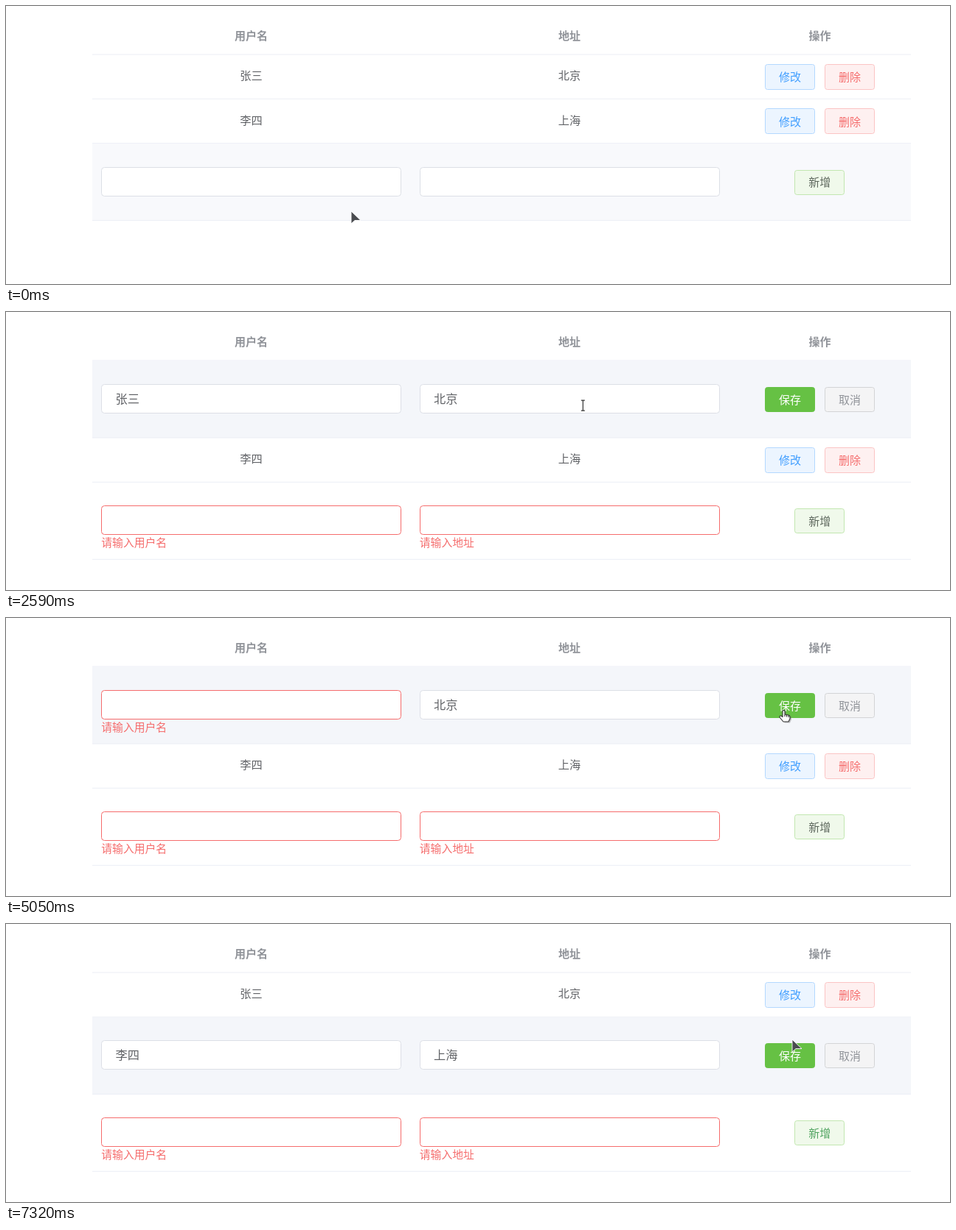
Animation of 1280x378 px, one loop 7390 ms. Source, as an HTML page:

```html
<!DOCTYPE html>
<html lang="zh-CN">
<head>
<meta charset="utf-8">
<style>
html, body { margin: 0; height: 100%; overflow: hidden; background: #fff; }
svg { display: block; width: 100%; height: 100%; }
text { font-family: "Noto Sans CJK SC", "Noto Sans CJK", sans-serif; white-space: pre; }
</style>
</head>
<body>
<svg id="stage" viewBox="0 0 1280 378"></svg>
<script>
const LOOP = 7390;
const stage = document.getElementById('stage');

// main, pale background, pale border
const THEMES = {
  primary: ['#409eff', '#ecf5ff', '#b3d8ff'],
  danger: ['#f56c6c', '#fef0f0', '#fbc4c4'],
  success: ['#66c144', '#f0f9eb', '#c2e7b0'],
  info: ['#909399', '#f4f4f5', '#d3d4d6']
};

// Pointer path: time, x, y, shape from this moment on
const PATH = [
  [0, 468, 279, 'arrow'], [70, 468, 279, 'arrow'], [200, 438, 274, 'arrow'],
  [560, 900, 222, 'arrow'], [740, 1085, 230, 'hand'], [800, 1090, 236, 'hand'],
  [1130, 1090, 236, 'hand'], [1260, 1077, 223, 'hand'], [1330, 1067, 166, 'hand'],
  [1470, 1062, 101, 'hand'], [2260, 1062, 101, 'arrow'], [2400, 960, 112, 'arrow'],
  [2440, 925, 116, 'beam'], [2590, 783, 127, 'beam'], [2920, 560, 142, 'arrow'],
  [3130, 440, 140, 'arrow'], [3200, 400, 126, 'beam'], [3720, 308, 121, 'beam'],
  [3990, 150, 121, 'beam'], [4130, 150, 121, 'none'], [4260, 440, 146, 'arrow'],
  [4330, 503, 150, 'arrow'], [4700, 960, 136, 'arrow'], [4800, 1042, 128, 'hand'],
  [4860, 1054, 125, 'hand'], [5390, 1054, 125, 'hand'], [5560, 1112, 122, 'hand'],
  [5790, 1143, 121, 'hand'], [5990, 1146, 125, 'none'], [6190, 1148, 143, 'hand'],
  [6420, 1105, 160, 'hand'], [6650, 1066, 165, 'hand'], [6860, 1066, 165, 'arrow'],
  [7050, 1066, 157, 'arrow'], [LOOP, 1066, 157, 'arrow']
];

const SHAPES = {
  arrow: '<path d="M0 0V17L5 12.5H13Z" fill="#4a4c50" stroke="#fff" stroke-width=".9"/>',
  beam: '<path d="M-2.5 -7H2.5M0 -7V7M-2.5 7H2.5" fill="none" stroke="#333" stroke-width="1.2"/>',
  hand: '<path d="M0 1.5Q1.5 -.8 3 1.5V6L8 7Q10 7.5 10 9.5V12L8 16.5H1L-4 10.5Q-4.6 8 -2 8.5L0 10Z" ' +
    'transform="translate(1 1)" fill="#666" opacity=".4"/>' +
    '<path d="M-1 1.5Q.5 -.8 2 1.5V6L7 7Q9 7.5 9 9.5V12L7 16H0L-5 10Q-5.4 7.6 -3 8L-1 9.5Z' +
    'M2 6V9M4.5 7V9.5M7 7.5V10" fill="#fff" stroke="#333" stroke-width="1.1" stroke-linejoin="round"/>',
  none: ''
};

const clamp = v => Math.max(0, Math.min(1, v));
const between = (t, a, b) => t >= a && t < b;
const fade = (t, on, off) => clamp((t - on) / 250) * (1 - clamp((t - off) / 250));

function rect(x, y, w, h, fill, extra = '') {
  return `<rect x="${x}" y="${y}" width="${w}" height="${h}" fill="${fill}" ${extra}/>`;
}

// Rounded box whose one-pixel border sits on whole pixels
function box(x, y, w, h, r, fill, edge) {
  return rect(Math.round(x) + .5, Math.round(y) + .5, w - 1, h - 1, fill, `rx="${r}" stroke="${edge}"`);
}

function label(s, x, cy, size, fill, extra = 'text-anchor="middle"') {
  return `<text x="${x}" y="${cy + size * 0.38}" font-size="${size}" fill="${fill}" ${extra}>${s}</text>`;
}

function button(s, x, y, h, theme, hot, color) {
  const [main, pale, edge] = THEMES[theme];
  return box(x, y, 68, h, 3, hot ? main : pale, hot ? main : edge) +
    label(s, x + 34, y + h / 2, 15, hot ? '#fff' : color || main);
}

function input(x, top, value, edge, error) {
  return box(x, top + 32, 407, 40, 4, '#fff', edge) +
    label(value, x + 19.5, top + 52, 16.2, '#606266', '') +
    (error ? label(error, x + .3, top + 82.3, 14.8, '#f56c6c', '') : '');
}

function backdrop(top, h, glow) {
  return rect(117, top, 1110, h, '#f4f6fa', `opacity="${glow}"`) +
    rect(117, top + h - .5, 1110, 1, '#ebeef5');
}

function viewRow(top, name, place, glow, hotEdit, hotDelete) {
  return backdrop(top, 60.3, glow) +
    label(name, 332.5, top + 28.5, 15.2, '#606266') +
    label(place, 764, top + 28.5, 15.2, '#606266') +
    button('修改', 1029, top + 13, 35, 'primary', hotEdit) +
    button('删除', 1110, top + 13, 35, 'danger', hotDelete);
}

function editRow(top, name, place, glow, hotSave, hotCancel, edge = '#dcdfe6', error = '') {
  return backdrop(top, 105, glow) +
    input(129, top, name, edge, error) +
    input(560.5, top, place, '#dcdfe6') +
    button('保存', 1029, top + 36, 34, 'success', hotSave) +
    button('取消', 1110, top + 36, 34, 'info', hotCancel);
}

function addRow(top, t) {
  const bad = t >= 880, edge = bad ? '#f56c6c' : '#dcdfe6';
  const color = t < 5990 ? '#5c665c' : t < 6790 ? '#5e7d50' : '#4fa35f';
  const glow = t < 860 ? .65 : 1 - clamp((t - 1400) / 250);
  return backdrop(top, 105, glow) +
    input(129, top, '', edge, bad && '请输入用户名') +
    input(560.5, top, '', edge, bad && '请输入地址') +
    button('新增', 1069.3, top + 36, 34, 'success', between(t, 740, 2190), color);
}

// Focus, selection, deletion and validation of the first name field
function firstEdit(top, t) {
  const focused = between(t, 3300, 4920), failed = t >= 4920;
  const name = t < 4130 ? '张三' : '';
  let s = editRow(top, name, '北京', fade(t, 1450, 6250),
    t < 2990 || between(t, 4800, 5470), t >= 5560,
    focused ? '#409eff' : failed ? '#f56c6c' : '#dcdfe6', failed && '请输入用户名');
  if (between(t, 3790, 4130)) {
    const left = 181 - 33 * clamp((t - 3860) / 130);
    const picked = rect(left, top + 43, 181 - left, 20, '#3390ff');
    s += picked + `<clipPath id="picked">${picked}</clipPath>` +
      label(name, 148.5, top + 52, 16.2, '#fff', 'clip-path="url(#picked)"');
  } else if (between(t, 3300, 4660)) {
    s += rect(name ? 182 : 148.5, top + 43, 1.5, 18, '#333');
  }
  return s;
}

function pointer(t) {
  const i = PATH.findIndex(p => p[0] > t) - 1;
  const a = PATH[i], b = PATH[i + 1];
  const k = (t - a[0]) / (b[0] - a[0]);
  const x = a[1] + (b[1] - a[1]) * k, y = a[2] + (b[2] - a[2]) * k;
  return `<g transform="translate(${x} ${y})">${SHAPES[a[3]]}</g>`;
}

function draw(t) {
  const first = between(t, 2190, 5990), second = t >= 6790;
  const row2 = 66 + (first ? 105 : 60.3);
  const row3 = row2 + (second ? 105 : 60.3);
  const bold = 'text-anchor="middle" font-weight="bold"';
  stage.innerHTML =
    label('用户名', 332.5, 40, 15, '#909399', bold) +
    label('地址', 764, 40, 15, '#909399', bold) +
    label('操作', 1103.5, 40, 15, '#909399', bold) +
    rect(117, 65.5, 1110, 1, '#ebeef5') +
    (first ? firstEdit(66, t)
      : viewRow(66, '张三', '北京', fade(t, 1450, 6250), between(t, 1430, 2190), false)) +
    (second ? editRow(row2, '李四', '上海', fade(t, 6250, LOOP), true, false)
      : viewRow(row2, '李四', '上海', fade(t, 6250, LOOP), between(t, 6500, 6790), between(t, 6190, 6400))) +
    addRow(row3, t) +
    pointer(t);
}

function tick() {
  draw(performance.now() % LOOP);
  requestAnimationFrame(tick);
}
tick();
</script>
</body>
</html>
```
